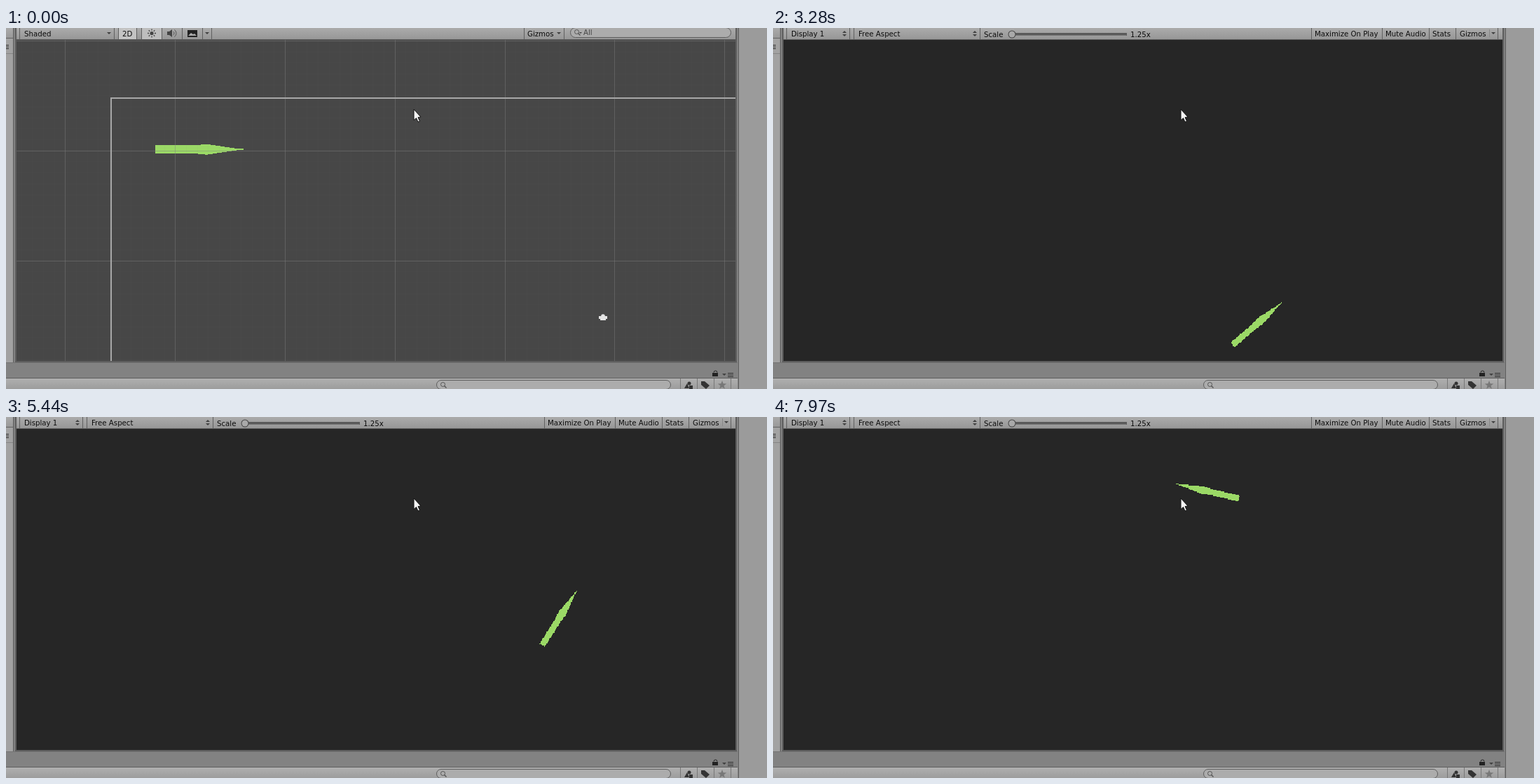
These frames come from a looping animation (1086 px wide and 515 px high, 8 s). An HTML page with a canvas:

```html
<!DOCTYPE html>
<html>
<head>
<meta charset="utf-8">
<style>
html, body { margin: 0; width: 100%; height: 100%; overflow: hidden; background: #9b9b9b; }
canvas { display: block; }
</style>
</head>
<body>
<canvas id="stage" width="1086" height="515"></canvas>
<script>
const ctx = document.getElementById('stage').getContext('2d');
const LOOP = 8000, PLAY = 1240, LAUNCH = 1800, RETURN = 6600;
const STEP = 78.1, KNOT = 300;
const GREEN = '#9bd966', INK = '#404040', EDGE = '#5e5e5e';

// Waypoints, one every KNOT ms
const outbound = [
  [119, 105], [141, 157], [168, 221], [213, 326], [404, 484], [700, 413],
  [688, 204], [584, 127], [498, 121], [396, 189], [369, 395], [590, 474],
  [762, 327], [850, 176], [893, 105], [907, 91], [918, 85.5]
];
const inbound = [[918, 86], [882, 112], [802, 170], [715, 155], [653, 117], [595, 100]];

function rect(x, y, w, h, color) {
  ctx.fillStyle = color;
  ctx.fillRect(x, y, w, h);
}

function shade(x, y, w, h, top, bottom) {
  const g = ctx.createLinearGradient(0, y, 0, y + h);
  g.addColorStop(0, top);
  g.addColorStop(1, bottom);
  rect(x, y, w, h, g);
}

function poly(points, color) {
  ctx.beginPath();
  points.forEach(([x, y]) => ctx.lineTo(x, y));
  ctx.closePath();
  ctx.fillStyle = color;
  ctx.fill();
}

function disc(x, y, r, color) {
  ctx.beginPath();
  ctx.arc(x, y, r, 0, 7);
  ctx.fillStyle = color;
  ctx.fill();
}

function arc(x, y, r, from, to, color) {
  ctx.beginPath();
  ctx.arc(x, y, r, from, to);
  ctx.strokeStyle = color;
  ctx.lineWidth = 1;
  ctx.stroke();
}

function line(x1, y1, x2, y2, color, width = 1) {
  ctx.beginPath();
  ctx.moveTo(x1, y1);
  ctx.lineTo(x2, y2);
  ctx.strokeStyle = color;
  ctx.lineWidth = width;
  ctx.stroke();
}

function label(text, x, y = 12, color = '#0c0c0c') {
  ctx.font = '10.2px "DejaVu Sans", sans-serif';
  ctx.fillStyle = color;
  ctx.fillText(text, x, y);
}

function searchBox(x, y, w, h) {
  ctx.beginPath();
  ctx.roundRect(x, y, w, h, h / 2);
  ctx.fillStyle = '#acacac';
  ctx.fill();
  ctx.strokeStyle = EDGE;
  ctx.lineWidth = 1;
  ctx.stroke();
  arc(x + 9, y + 6, 3, 0, 7, '#555');
  line(x + 11, y + 8, x + 14, y + 11, '#555', 1.4);
}

// Small triangle; a negative size points up
const arrow = (x, y, s = 3) => poly([[x - s, y], [x + s, y], [x, y + s]], INK);

function updown(x) {
  arrow(x, 7, -3);
  arrow(x, 9);
}

function menuLines(x, y, w) {
  for (let i = 0; i < 3; i++) rect(x, y + i * 2.5, w, 1, '#333');
}

const ring = (n, x, y, radius) => Array.from({ length: n }, (_, i) => {
  const a = i * 2 * Math.PI / n - Math.PI / 2;
  return [x + radius(i) * Math.cos(a), y + radius(i) * Math.sin(a)];
});

function chrome() {
  rect(0, 0, 1086, 515, '#828282');
  rect(1046, 0, 40, 515, '#9b9b9b');
  rect(1045, 0, 1, 515, EDGE);
  rect(0, 0, 10, 477, '#a2a2a2');
  shade(0, 0, 10, 14, '#aaa', '#999');
  rect(0, 14, 10, 1, '#626262');
  rect(0, 36, 10, 1, '#858585');
  menuLines(0, 24, 4);
  rect(10, 0, 1, 477, EDGE);
  rect(13, 0, 1030, 477, EDGE);
  shade(15, 0, 1026, 16, '#ababab', '#979797');
  rect(0, 477, 1044, 1, '#747474');

  rect(0, 499, 1044, 1, EDGE);
  shade(0, 500, 1044, 15, '#b0b0b0', '#9c9c9c');
  searchBox(614.5, 502.5, 334, 13);
  for (let i = 0; i < 4; i++) rect(962 + i * 24, 500, 1, 15, '#777');
  poly([[968, 514], [972, 507], [975, 514]], '#333');
  disc(975, 507, 2.5, '#333');
  rect(975, 510, 5, 5, '#333');
  poly([[992, 504], [997, 504], [1004, 510], [999, 515], [992, 509]], '#333');
  poly(ring(10, 1022, 509.5, i => i % 2 ? 2.7 : 6.5), '#777');
  rect(1008, 492, 8, 5, '#222');
  arc(1012.5, 491.5, 2.5, Math.PI, 0, '#222');
  arrow(1025, 493);
  menuLines(1030, 492, 8);
}

function dividers(...xs) {
  for (const x of xs) rect(x, 0, 1, 16, '#606060');
}

function sceneBar() {
  dividers(19, 154, 160, 186, 193, 222, 251, 280, 293, 739, 796);
  rect(161, 0, 25, 16, '#c3c3c3');
  rect(194, 0, 28, 16, '#bebebe');
  label('Shaded', 26);
  label('2D', 166);
  label('Gizmos', 744);
  for (const x of [147, 287, 789]) arrow(x, 6);
  disc(208, 7.5, 2.6, '#444');
  const inner = ring(8, 208, 7.5, () => 4), outer = ring(8, 208, 7.5, () => 6);
  inner.forEach((p, i) => line(...p, ...outer[i], '#444', 1.3));
  poly([[230, 5], [233, 5], [237, 2], [237, 13], [233, 10], [230, 10]], '#444');
  for (const r of [3, 6]) arc(237, 7.5, r, -1, 1, '#555');
  rect(259, 3, 14, 10, '#222');
  poly([[260, 11], [264, 7], [267, 9], [269, 8], [272, 11]], '#aaa');
  searchBox(805.5, -.5, 229, 14);
  arrow(820, 6, 2);
  label('All', 824, 10, '#444');
}

function gameBar() {
  dividers(19, 109, 115, 295, 768, 869, 936, 974, 1034);
  rect(1022, 2, 1, 11, '#888');
  label('Display 1', 26);
  label('Free Aspect', 122);
  updown(102);
  updown(288);
  label('Scale', 301, 13);
  rect(338, 7, 167, 4, '#5a5a5a');
  rect(339, 10, 165, 1, '#777');
  disc(341, 9, 5.5, '#444');
  disc(341, 9, 4.5, '#a9a9a9');
  label('1.25x', 510, 13);
  label('Maximize On Play', 773);
  label('Mute Audio', 874);
  label('Stats', 941);
  label('Gizmos', 980);
  arrow(1028, 6);
}

function grid(gap, alpha) {
  const color = `rgba(128,128,128,${alpha})`;
  for (let x = 84.4 % gap; x < 1041; x += gap)
    if (x > 15) rect(Math.round(x), 17, 1, 458, color);
  for (let y = 174.8 % gap; y < 475; y += gap)
    if (y > 17) rect(15, Math.round(y), 1026, 1, color);
}

function sceneView() {
  rect(15, 17, 1026, 458, '#474747');
  rocket({ x: 275.5, y: 173.2, angle: 0 }, 1.36, 1);
  grid(15.68, .04);
  grid(156.8, .43);
  rect(149, 99, 892, 2, '#a8a8a8');
  rect(149, 99, 2, 376, '#a8a8a8');
  disc(852, 411, 2.8, '#e4e4e4');
  rect(848, 411, 8, 6, '#e4e4e4');
  rect(846, 411, 12, 4, '#e4e4e4');
}

// Half thickness of the rocket at distance u from its centre
function halfWidth(u) {
  if (u < -46 || u > 46.5) return 0;
  if (u < -5) return 4.3;
  if (u < 8) return 4.3 + (u + 5) / 13 * 1.2;
  return Math.max(.6, 5.5 * (46 - u) / 38);
}

// Drawn in hard-edged cells, without smoothing
function rocket({ x, y, angle }, scale, cell) {
  const reach = 50 * scale, c = Math.cos(angle), s = Math.sin(angle);
  const edge = i => Math.round(i * cell);
  ctx.fillStyle = GREEN;
  for (let j = Math.floor((y - reach) / cell); j * cell < y + reach; j++) {
    for (let i = Math.floor((x - reach) / cell); i * cell < x + reach; i++) {
      const dx = ((i + .5) * cell - x) / scale, dy = ((j + .5) * cell - y) / scale;
      if (Math.abs(dy * c - dx * s) < halfWidth(dx * c + dy * s))
        ctx.fillRect(edge(i), edge(j), edge(i + 1) - edge(i), edge(j + 1) - edge(j));
    }
  }
}

// Smooth curve through evenly timed points; the rocket faces its velocity
function follow(points, time) {
  const last = points.length - 1;
  const n = Math.min(last - 1, Math.floor(time / KNOT)), u = time / KNOT - n;
  const axis = k => {
    const at = i => {
      if (i < 0) return points[0][k] + i * (points[1][k] - points[0][k]);
      if (i > last) return points[last][k] + (i - last) * (points[last][k] - points[last - 1][k]);
      return points[i][k];
    };
    const slope = i => (8 * (at(i + 1) - at(i - 1)) - at(i + 2) + at(i - 2)) / 12;
    const a = slope(n), b = slope(n + 1), d = at(n + 1) - at(n);
    const c3 = a + b - 2 * d, c2 = 3 * d - 2 * a - b;
    return [at(n) + u * (a + u * (c2 + u * c3)), a + u * (2 * c2 + 3 * u * c3)];
  };
  const [x, vx] = axis(0), [y, vy] = axis(1);
  return { x, y, angle: Math.atan2(vy, vx) };
}

function pose(t) {
  if (t < LAUNCH) return { x: 105, y: 71, angle: 0 };
  const time = LAUNCH + STEP * Math.round((t - LAUNCH) / STEP);
  return time < RETURN ? follow(outbound, time - LAUNCH) : follow(inbound, time - RETURN);
}

function gameView(t) {
  rect(15, 17, 1026, 458, '#262626');
  ctx.save();
  ctx.beginPath();
  ctx.rect(15, 17, 1026, 458);
  ctx.clip();
  rocket(pose(t), 1, 1.25);
  ctx.restore();
}

function cursor() {
  poly([[582, 116], [582, 131.5], [585.5, 128.5], [588, 134], [590.5, 133],
    [588, 127.5], [592, 127]], '#f4f4f4');
  ctx.strokeStyle = '#111';
  ctx.lineWidth = 1;
  ctx.stroke();
}

function draw(t) {
  chrome();
  if (t < PLAY) {
    sceneBar();
    sceneView();
  } else {
    gameBar();
    gameView(t);
  }
  cursor();
}

let origin;
function tick(now) {
  origin ??= now;
  draw((now - origin) % LOOP);
  requestAnimationFrame(tick);
}
requestAnimationFrame(tick);
</script>
</body>
</html>
```
